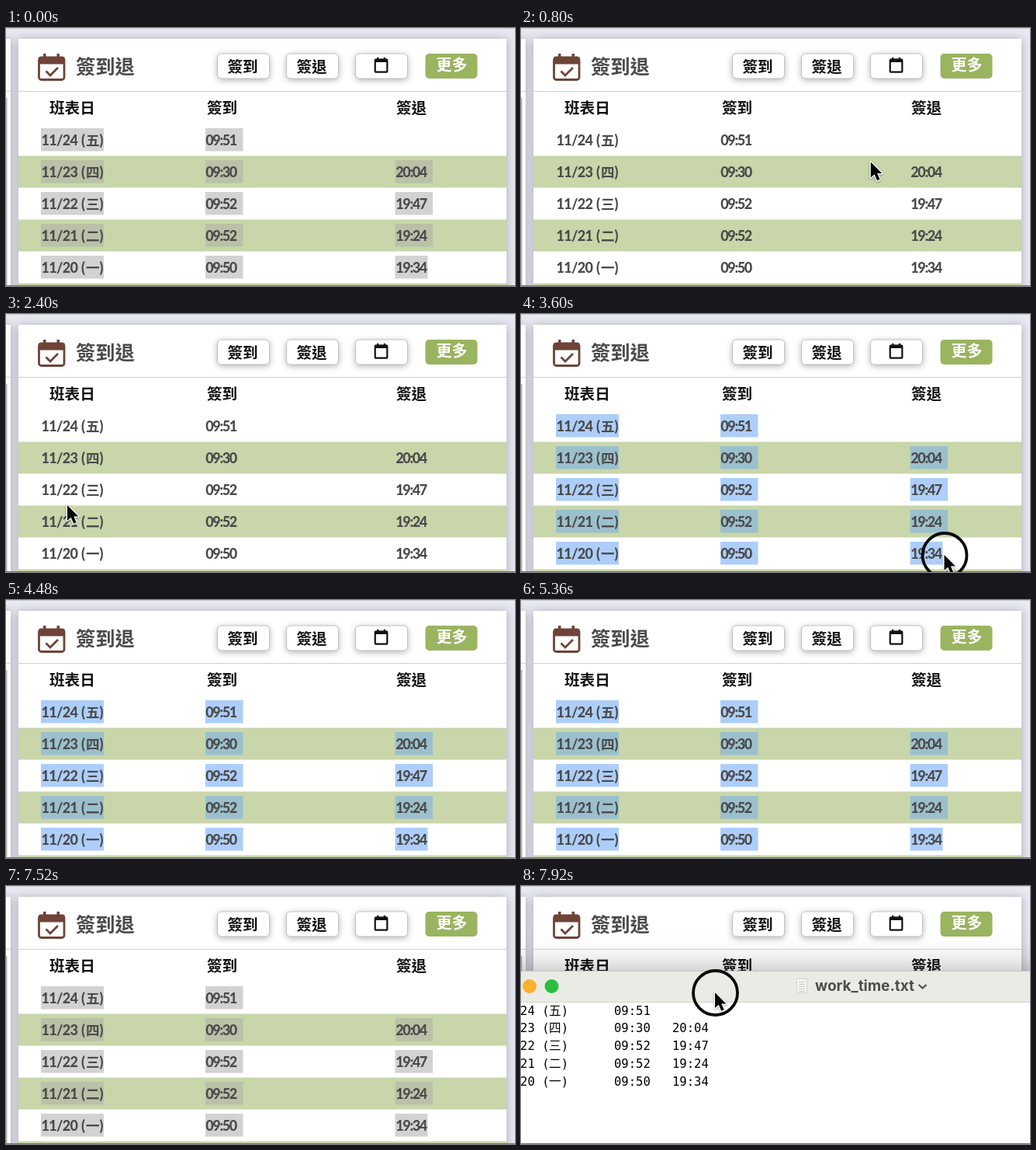
Write an HTML page with a canvas that moves like this. It is 656 by 332 pixels and loops after 8000 ms.

```html
<!DOCTYPE html>
<html lang="zh-Hant">
<head>
<meta charset="utf-8">
<title>簽到退</title>
<style>
html, body { margin: 0; width: 100%; height: 100%; overflow: hidden; background: #ebebf3; }
canvas { display: block; width: 656px; height: 332px; }
</style>
</head>
<body>
<canvas id="stage" width="656" height="332"></canvas>
<script>
const W = 656, H = 332, LOOP = 8000, STEP = 80;
const ctx = document.getElementById('stage').getContext('2d');
const CJK = '"Noto Sans CJK TC", "Noto Sans CJK", sans-serif';
const LATIN = 'Lato, sans-serif';
const MONO = '"DejaVu Sans Mono", "Noto Sans CJK TC", monospace';

const ROWS = [
  ['11/24', '五', '09:51', ''],
  ['11/23', '四', '09:30', '20:04'],
  ['11/22', '三', '09:52', '19:47'],
  ['11/21', '二', '09:52', '19:24'],
  ['11/20', '一', '09:50', '19:34']
];
const CELLS = [[45, 126], [257, 305.5], [501.5, 550]];
const ROW_TOP = 123.5, ROW_H = 41;
const SELECTION = {
  blue: ['#adcefa', '#9bc0cd'],
  gray: ['#d2d2d2', '#bac1a6']
};

// Pointer tracks: [time, x, y]
const TRACKS = [
  [[160, 588, 250], [320, 617, 294], [560, 617, 294], [880, 420, 150],
   [1120, 150, 50], [1280, 101, 43], [1440, 70, 45], [1600, 130, 44], [1760, 110, 50],
   [2000, 255, 130], [2240, 110, 225], [2400, 79, 246], [2640, 78, 249],
   [2800, 36, 122], [2880, 32, 138], [3040, 32, 138],
   [3600, 545.5, 310], [3760, 557, 311], [4160, 557, 311], [4560, 550, 345]],
  [[7600, 255, 373], [7680, 254, 325], [7760, 253, 240], [7840, 251, 168],
   [7920, 250, 137], [8000, 250, 137]]
];
const PRESSES = [[400, 560], [3040, 4000], [7520, 8000]];

function pointerAt(t) {
  for (const track of TRACKS) {
    for (let i = 1; i < track.length; i++) {
      const [t0, x0, y0] = track[i - 1], [t1, x1, y1] = track[i];
      if (t < t0 || t > t1) continue;
      const p = (t - t0) / (t1 - t0), k = p * p * (3 - 2 * p);
      return { x: x0 + (x1 - x0) * k, y: y0 + (y1 - y0) * k };
    }
  }
  return null;
}

function rect(x, y, w, h, color) {
  ctx.fillStyle = color;
  ctx.fillRect(x, y, w, h);
}

function text(str, x, y, font, color, spacing = 0) {
  ctx.font = font;
  ctx.letterSpacing = spacing + 'px';
  ctx.fillStyle = color;
  ctx.fillText(str, x, y);
  ctx.letterSpacing = '0px';
}

function line(points, color, width) {
  ctx.beginPath();
  points.forEach(([x, y]) => ctx.lineTo(x, y));
  ctx.strokeStyle = color;
  ctx.lineWidth = width;
  ctx.stroke();
}

function circle(x, y, r, color) {
  ctx.beginPath();
  ctx.arc(x, y, r, 0, 7);
  ctx.fillStyle = color;
  ctx.fill();
}

function shadow(color, blur, dy, draw) {
  ctx.save();
  ctx.shadowColor = color;
  ctx.shadowBlur = blur;
  ctx.shadowOffsetY = dy;
  draw();
  ctx.restore();
}

function button(x, fill, border) {
  ctx.beginPath();
  ctx.roundRect(x + .5, 33, 67, 32, 5);
  ctx.fillStyle = fill;
  if (!border) return ctx.fill();
  shadow('rgba(0,0,0,.32)', 8, 2, () => ctx.fill());
  ctx.strokeStyle = border;
  ctx.lineWidth = 1;
  ctx.stroke();
}

function calendarBadge() {
  const brown = '#6f4337';
  ctx.beginPath();
  ctx.roundRect(42.5, 38, 32.5, 28.5, 3);
  ctx.strokeStyle = brown;
  ctx.lineWidth = 2.8;
  ctx.stroke();
  rect(42, 37.5, 33.5, 9, brown);
  rect(48, 33, 3.5, 6, brown);
  rect(65.5, 33, 3.5, 6, brown);
  line([[51.5, 55.5], [57, 61], [67, 51]], brown, 2.8);
}

function calendarButton() {
  ctx.beginPath();
  ctx.roundRect(475.7, 40.7, 15.6, 16, 1.5);
  ctx.strokeStyle = '#111';
  ctx.lineWidth = 2.2;
  ctx.stroke();
  rect(475, 39.8, 17, 4.2, '#111');
  rect(478, 37.8, 2.3, 3, '#111');
  rect(486.7, 37.8, 2.3, 3, '#111');
}

function page() {
  rect(0, 0, W, H, '#e9e9f2');
  rect(0, 0, W, 1, '#c9c9d3');
  shadow('rgba(60,60,85,.38)', 12, 1, () => {
    rect(-20, 14, 26, H, '#fff');
    rect(16, 14, 629, H, '#fff');
  });
  rect(0, 81, 6, 1, '#d2d2d2');
  rect(0, 90, 1.5, H, '#b4b4b8');
  rect(16, 81, 629, 1, '#d0d0d0');

  calendarBadge();
  text('簽到退', 90, 59, '900 25.3px ' + CJK, '#4b4b4b');
  button(272, '#fff', '#c2c2c2');
  button(361, '#fff', '#c2c2c2');
  button(450, '#fff', '#c2c2c2');
  button(540, '#9ab45f');
  const bold = 'bold 19.6px ' + CJK;
  text('簽到', 285.5, 57, bold, '#111');
  text('簽退', 374.5, 57, bold, '#111');
  text('更多', 554.5, 55, 'bold 20px ' + CJK, '#fff');
  calendarButton();

  text('班表日', 56, 110, bold, '#111');
  text('簽到', 259, 110, bold, '#111');
  text('簽退', 503, 110, bold, '#111');
}

// Right limit of the highlight in a row, following the drag
function reach(row, t, pointer) {
  if (t < 400 || t >= 3600) return W;
  if (t < 3040 || !pointer) return 0;
  const current = Math.floor((pointer.y - ROW_TOP) / ROW_H);
  return row < current ? W : row === current ? pointer.x : 0;
}

function table(t, pointer) {
  const colors = t >= 400 && t < 5920 ? SELECTION.blue : SELECTION.gray;
  const latin = '800 18px ' + LATIN;
  const ink = '#4a4a4a';
  ROWS.forEach(([date, day, start, end], i) => {
    const top = ROW_TOP + i * ROW_H, base = top + 27;
    if (i % 2) rect(16, top, 629, ROW_H, '#c8d6aa');
    const limit = reach(i, t, pointer);
    [date, start, end].forEach((value, c) => {
      if (!value) return;
      const [left, right] = CELLS[c];
      const edge = Math.min(limit, i === 4 && c === 2 ? 543.5 : right);
      if (edge > left) rect(left, 129 + i * ROW_H, edge - left, 29.5, colors[i % 2]);
    });
    text(date, 45.5, base, latin, ink, -.7);
    text('(', 97, base, latin, ink);
    text(day, 103, base + .3, 'bold 17.6px ' + CJK, ink);
    text(')', 120.5, base, latin, ink);
    text(start, 257.3, base, latin, ink, -1.4);
    text(end, 502.3, base, latin, ink, -1.4);
  });
  rect(16, 328.5, 629, 4, '#c8d6aa');
}

function editor(top) {
  shadow('rgba(0,0,0,.42)', 44, 6, () => rect(-37, top, 950, 420, '#fff'));
  rect(0, top, W, 41, '#ebebe6');
  rect(0, top, W, 1, '#c6c6c2');
  rect(0, top + 40, W, 1, '#d3d3ce');
  circle(11, top + 20, 9, '#f6b12d');
  circle(39.5, top + 20, 9, '#2bbf42');

  rect(355, top + 10, 14, 19, '#f6f6f4');
  ctx.strokeStyle = '#d2d2cf';
  ctx.lineWidth = 1;
  ctx.strokeRect(355.5, top + 10.5, 13, 18);
  for (let y = 14; y < 27; y += 3) rect(358, top + y, 8, 1, '#c4c4c2');
  text('work_time.txt', 379, top + 25.5, 'bold 19px Inter, sans-serif', '#4d4d4b');
  line([[512.5, top + 18], [517.5, top + 22.5], [522.5, top + 18]], '#4d4d4b', 2.2);

  const font = '15.55px ' + MONO;
  ROWS.forEach(([date, day, start, end], i) => {
    const y = top + 56.7 + i * 22.75;
    text(date + ' (', -29, y, font, '#000');
    text(day, 36, y, '500 15.6px ' + CJK, '#000');
    text(')', 51.7, y, font, '#000');
    text(start, 120, y, font, '#000');
    text(end, 195, y, font, '#000');
  });
}

function drawPointer({ x, y }, pressed) {
  if (pressed) {
    ctx.beginPath();
    ctx.arc(x + .5, y + .5, 28.5, 0, 7);
    ctx.strokeStyle = '#0b0b0b';
    ctx.lineWidth = 3.8;
    ctx.stroke();
  }
  const shape = [[0, 0], [0, 20], [4.7, 15.8], [8.2, 23.8], [11.7, 22.2], [8.3, 14.6], [14.4, 14.4]];
  ctx.beginPath();
  shape.forEach(([dx, dy]) => ctx.lineTo(x + dx, y + dy));
  ctx.closePath();
  ctx.lineJoin = 'round';
  ctx.strokeStyle = '#fff';
  ctx.lineWidth = 2.6;
  shadow('rgba(0,0,0,.35)', 3, 1, () => ctx.stroke());
  ctx.fillStyle = '#050505';
  ctx.fill();
  ctx.lineJoin = 'miter';
}

function draw(t) {
  const pointer = pointerAt(t);
  page();
  table(t, pointer);
  if (t >= 7600) editor(pointer.y - 28);
  rect(0, 331, W, 1, '#77777b');
  if (pointer) drawPointer(pointer, PRESSES.some(([a, b]) => t >= a && t < b));
}

function tick() {
  const t = performance.now() % LOOP;
  draw(Math.floor(t / STEP) * STEP);
  requestAnimationFrame(tick);
}
tick();
</script>
</body>
</html>
```
